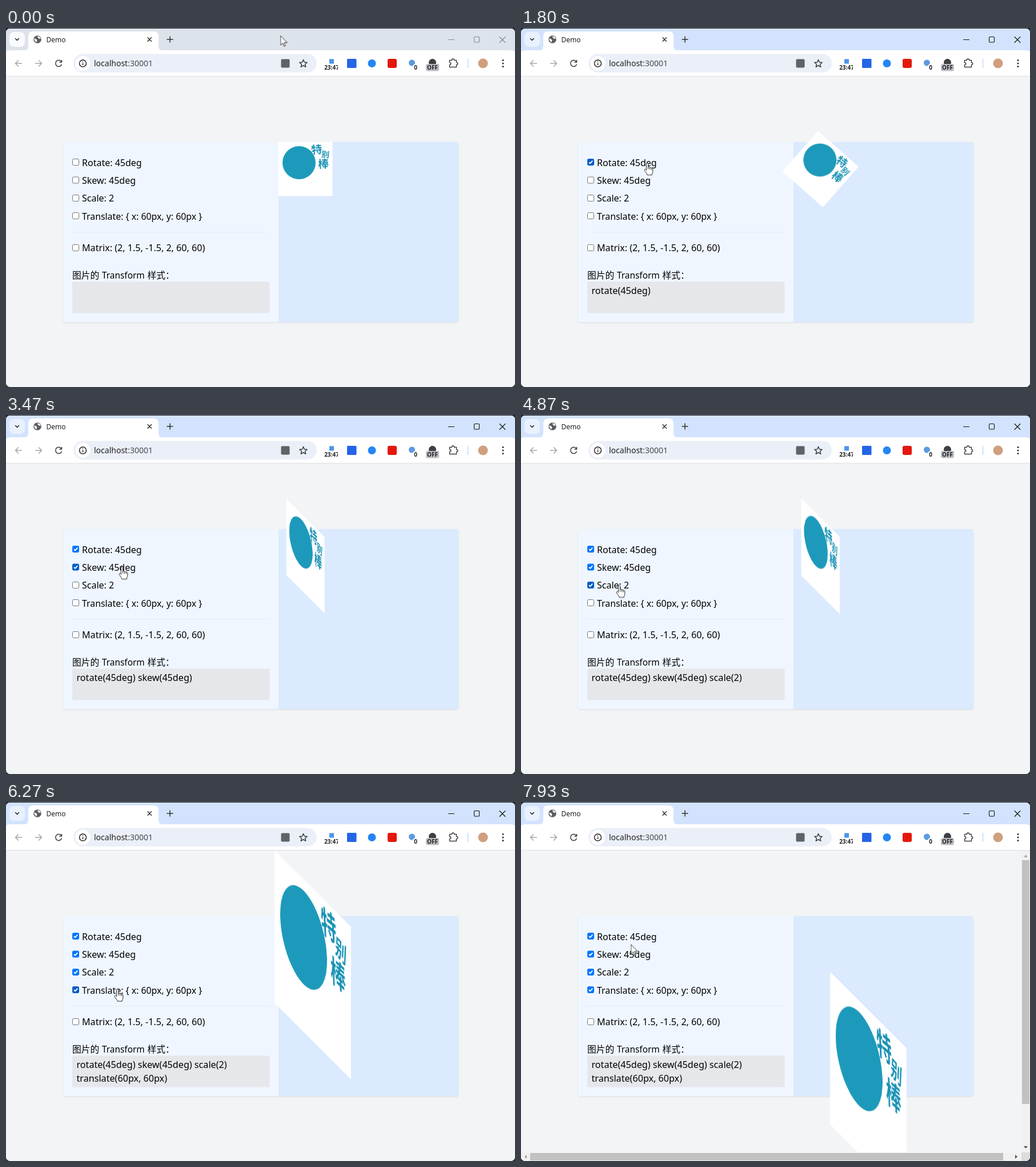
An HTML page for the animation above (8000 ms loop, 891 px wide and 629 px high).

```html
<!DOCTYPE html>
<html lang="zh">
<head>
<meta charset="utf-8">
<title>Demo</title>
<style>
  html, body { margin: 0; height: 100%; overflow: hidden; background: #23262c; }
  svg { display: block; width: 100vw; height: 100vh; font: 16px "Noto Sans", "Open Sans", sans-serif; }
  .cjk { font-family: "Noto Sans CJK SC", "Noto Sans CJK", sans-serif; }
  .label { font-size: 15.75px; }
  .output { font-size: 16.15px; }
  .line { fill: none; stroke-width: 1.5; stroke-linecap: round; stroke-linejoin: round; }
  .badge { font-size: 10px; font-weight: 700; text-anchor: middle; fill: #202124; }
  .step { animation: 8s step-end infinite; }

  /* window focus */
  .strip { fill: #d3e3fd; animation-name: strip; }
  .menu { fill: #e9f1fe; animation-name: menu; }
  .controls { stroke: #111; stroke-width: 1.1; animation-name: controls; }
  @keyframes strip { 0% { fill: #dde3eb } 15% { fill: #d3e3fd } }
  @keyframes menu { 0% { fill: #fafbfd } 15% { fill: #e9f1fe } }
  @keyframes controls { 0% { stroke: #85898f } 15% { stroke: #111 } }

  /* checkboxes: idle, hover, press, checked; the white tick shows once the box is blue */
  .box { fill: #fff; stroke: #767676; }
  .tick { stroke: #fff; stroke-width: 1.8; stroke-linecap: butt; }
  .rotate { animation-name: rotate; }
  .skew { animation-name: skew; }
  .scale { animation-name: scale; }
  .move { animation-name: move; }
  @keyframes rotate {
    0% { fill: #fff; stroke: #767676 }
    7.3% { fill: #fff; stroke: #4f4f4f }
    15% { fill: #fff; stroke: #8d8d8d }
    17.5% { fill: #005cc8; stroke: #005cc8 }
    25.5%, 100% { fill: #0075ff; stroke: #0075ff }
  }
  @keyframes skew {
    0% { fill: #fff; stroke: #767676 }
    26.1% { fill: #fff; stroke: #4f4f4f }
    34.1% { fill: #fff; stroke: #8d8d8d }
    37.5%, 97% { fill: #005cc8; stroke: #005cc8 }
    51.7%, 98.1%, 100% { fill: #0075ff; stroke: #0075ff }
  }
  @keyframes scale {
    0% { fill: #fff; stroke: #767676 }
    52.5% { fill: #fff; stroke: #4f4f4f }
    57.5% { fill: #fff; stroke: #8d8d8d }
    60.8% { fill: #005cc8; stroke: #005cc8 }
    65.9%, 100% { fill: #0075ff; stroke: #0075ff }
  }
  @keyframes move {
    0% { fill: #fff; stroke: #767676 }
    66.9% { fill: #fff; stroke: #4f4f4f }
    74.1% { fill: #fff; stroke: #8d8d8d }
    77.5% { fill: #005cc8; stroke: #005cc8 }
    95.5%, 100% { fill: #0075ff; stroke: #0075ff }
  }

  /* things that appear once */
  .out1 { animation-name: out1; }
  .out2 { animation-name: out2; }
  .out3 { animation-name: out3; }
  .out4 { animation-name: out4; }
  .bars { animation-name: bars; }
  @keyframes out1 { 0% { visibility: hidden } 17.5% { visibility: visible } }
  @keyframes out2 { 0% { visibility: hidden } 37.5% { visibility: visible } }
  @keyframes out3 { 0% { visibility: hidden } 60.8% { visibility: visible } }
  @keyframes out4 { 0% { visibility: hidden } 77.5% { visibility: visible } }
  @keyframes bars { 0% { visibility: hidden } 83% { visibility: visible } }

  .picture { transform-origin: 524.25px 247.25px; animation: picture 8s ease-in-out infinite; }
  @keyframes picture {
    0%, 17.5% { transform: rotate(0deg) skew(0deg) scale(1) translate(0px, 0px) }
    23.75%, 37% { transform: rotate(45deg) skew(0deg) scale(1) translate(0px, 0px) }
    43.25%, 60.4% { transform: rotate(45deg) skew(45deg) scale(1) translate(0px, 0px) }
    66.65%, 76.7% { transform: rotate(45deg) skew(45deg) scale(2) translate(0px, 0px) }
    82.95%, 100% { transform: rotate(45deg) skew(45deg) scale(2) translate(59.06px, 59.06px) }
  }

  .cursor { animation: cursor 8s ease-in-out infinite; fill: #fff; stroke: #222; stroke-linejoin: round; }
  .arrow { animation-name: arrow; }
  .hand { animation-name: hand; }
  @keyframes cursor {
    0%, 1.75% { transform: translate(480.5px, 13.5px) }
    8.4%, 24.1% { transform: translate(221px, 236.5px) }
    27.5%, 49.2% { transform: translate(203px, 266.5px) }
    55%, 63.75% { transform: translate(172px, 298.5px) }
    66.6% { transform: translate(192.5px, 315.5px) }
    70%, 94.2% { transform: translate(195px, 328px) }
    99.1%, 100% { transform: translate(192.5px, 249.5px) }
  }
  @keyframes arrow {
    0%, 25.5%, 51.7%, 65.9%, 95.5%, 98.1%, 100% { visibility: visible }
    7.3%, 26.1%, 52.5%, 66.9%, 97% { visibility: hidden }
  }
  @keyframes hand {
    0%, 25.5%, 51.7%, 65.9%, 95.5%, 98.1%, 100% { visibility: hidden }
    7.3%, 26.1%, 52.5%, 66.9%, 97% { visibility: visible }
  }
</style>
</head>
<body>
<svg viewBox="0 0 891 629">
  <defs>
    <clipPath id="window"><rect y="1" width="891" height="628" rx="7"/></clipPath>
    <clipPath id="page"><rect y="85" width="891" height="544"/></clipPath>
    <clipPath id="card"><rect x="100" y="200" width="692" height="315.5" rx="4"/></clipPath>
    <clipPath id="clock"><rect x="557" y="63" width="24" height="12"/></clipPath>
    <path id="tick" class="line tick" d="M2.5 5.7 4.6 7.9 8.7 3.1"/>
  </defs>

  <g clip-path="url(#window)">
    <rect width="891" height="629" fill="#f3f4f6"/>

    <!-- tab strip -->
    <rect class="step strip" width="891" height="40"/>
    <rect class="step menu" x="6" y="7" width="27" height="26" rx="8"/>
    <path class="line" d="M16.5 18.5 19.5 21.5 22.5 18.5" stroke="#222"/>
    <path d="M30 40c6 0 9-3 9-9V15c0-6 3-9 9-9H258c6 0 9 3 9 9V31c0 6 3 9 9 9z" fill="#fff"/>
    <circle cx="55" cy="20" r="6.8" fill="#5a5e63"/>
    <path d="M49.5 18.5c2 .3 4 1 4.6 2.5s-.6 2-.1 3.8c-2.5-.5-4.8-3-4.5-6.3zM55.5 14.5c2 0 4.5 1.5 5.2 3.5-1 1.5-3 .8-4-.3s-2-1.7-1.2-3.2z" fill="#fff"/>
    <text x="70.5" y="25" font-size="12" fill="#1f1f1f">Demo</text>
    <path class="line" d="M248 16.7 254.6 23.3M254.6 16.7 248 23.3M282 20H292M287 15V25" stroke="#333"/>
    <g class="line step controls">
      <path d="M774.5 20.5H784.5M864 15.5 874 25.5M874 15.5 864 25.5"/>
      <rect x="819.5" y="15.5" width="9" height="9.5" rx="1.5"/>
    </g>

    <!-- toolbar -->
    <path d="M0 85V47q0-8 8-8H883q8 0 8 8V85z" fill="#fff"/>
    <path d="M0 84.5H891" stroke="#dcdfe3"/>
    <path class="line" d="M27.5 62H16.5M21.5 57 16.5 62 21.5 67M51.5 62H62.5M57.5 57 62.5 62 57.5 67" stroke="#a2a5a9"/>
    <path class="line" d="M97.2 59.5a5.5 5.5 0 1 0 .1 4.6M97.5 56.5V60H94" stroke="#3c4043"/>
    <rect x="118" y="45.5" width="426" height="32.5" rx="16.2" fill="#ebeff8"/>
    <circle cx="134.5" cy="62" r="13" fill="#fff"/>
    <circle class="line" cx="134.5" cy="62" r="6" stroke="#222"/>
    <path d="M134.5 61.5V65M134.5 58.5V60" stroke="#222" stroke-width="1.5"/>
    <text x="154" y="67" font-size="14" fill="#1f1f1f">localhost<tspan fill="#474a50">:30001</tspan></text>
    <rect x="481.5" y="54.5" width="15" height="15" rx="2" fill="#5f6368"/>
    <path class="line" d="M520.5 55.5 522.4 60 527.2 60.4 523.5 63.5 524.7 68.3 520.5 65.7 516.3 68.3 517.5 63.5 513.8 60.4 518.6 60z" stroke="#3c4043"/>

    <!-- extensions -->
    <rect x="566" y="54.5" width="8" height="8" fill="#4c96e8"/>
    <g clip-path="url(#clock)"><text class="badge" x="570" y="73">23:47</text></g>
    <rect x="597" y="54" width="16.5" height="16" rx="1.5" fill="#2464e8"/>
    <circle cx="640.5" cy="62" r="7" fill="#2585f5"/>
    <rect x="668" y="54" width="16" height="16" rx="3" fill="#e3180c"/>
    <circle cx="710.5" cy="61" r="5.5" fill="#5b9be0"/>
    <rect x="712.5" y="64" width="9" height="11" rx="2" fill="#fff"/>
    <text class="badge" x="717" y="73">0</text>
    <circle cx="746.5" cy="60.5" r="6.5" fill="#3c4043"/>
    <rect x="735" y="63" width="23" height="12.5" rx="3" fill="#bcbec2"/>
    <text class="badge" x="746.5" y="73">OFF</text>
    <path class="line" d="M776.5 56.5H780.5C780.5 53.3 784.5 53.3 784.5 56.5H788.5V60.5C791.5 60.5 791.5 64.5 788.5 64.5V68.5H776.5V64.5C779.5 64.5 779.5 60.5 776.5 60.5z" stroke="#3c4043"/>
    <path d="M808.5 54V70" stroke="#c4d9fb" stroke-width="1.5"/>
    <circle cx="835" cy="62" r="8.5" fill="#cf9f7e"/>
    <path class="line" d="M870 56.5v0M870 62v0M870 67.5v0" stroke="#333" style="stroke-width:3.2"/>

    <!-- card -->
    <g style="filter:drop-shadow(0 1px 1px rgba(0,0,0,.1))">
      <g clip-path="url(#card)">
        <rect x="100" y="200" width="378" height="316" fill="#eff6ff"/>
        <rect x="477" y="200" width="315" height="316" fill="#dbeafe"/>
      </g>
    </g>
    <path d="M116 357.5H461" stroke="#e6ebf3"/>
    <rect x="116" y="444.5" width="345.5" height="55" rx="2" fill="#e5e7eb"/>

    <g transform="translate(116.5 229.5)"><rect class="step box rotate" width="11" height="11" rx="2"/><use href="#tick"/></g>
    <g transform="translate(116.5 261)"><rect class="step box skew" width="11" height="11" rx="2"/><use href="#tick"/></g>
    <g transform="translate(116.5 292.5)"><rect class="step box scale" width="11" height="11" rx="2"/><use href="#tick"/></g>
    <g transform="translate(116.5 323.5)"><rect class="step box move" width="11" height="11" rx="2"/><use href="#tick"/></g>
    <rect class="box" x="116.5" y="379.5" width="11" height="11" rx="2"/>

    <text x="133" y="241.5">Rotate: 45deg</text>
    <text x="133" y="273">Skew: 45deg</text>
    <text x="133" y="304.3">Scale: 2</text>
    <text x="133" y="335.8" font-size="15.85">Translate: { x: 60px, y: 60px }</text>
    <text x="133" y="391.4" font-size="16.1">Matrix: (2, 1.5, -1.5, 2, 60, 60)</text>
    <text class="cjk label" x="116" y="439">图片的</text>
    <text x="168" y="438.5" font-size="15.4">Transform</text>
    <text class="cjk label" x="247.5" y="439">样式：</text>
    <text class="output" x="123.5" y="466.3"><tspan class="step out1">rotate(45deg)</tspan><tspan class="step out2"> skew(45deg)</tspan><tspan class="step out3"> scale(2)</tspan></text>
    <text class="output step out4" x="123.5" y="489.8">translate(60px, 60px)</text>

    <!-- transformed picture -->
    <g clip-path="url(#page)">
      <g class="picture">
        <rect x="477" y="200" width="94.5" height="94.5" fill="#fff"/>
        <circle cx="513" cy="236" r="29" fill="#1d9abb"/>
        <g class="cjk" fill="#1b93b5" font-weight="700" text-anchor="middle">
          <text transform="translate(544.5 220) rotate(-5)" font-size="19">特</text>
          <text transform="translate(558.7 226.5) rotate(5)" font-size="14">别</text>
          <text transform="translate(556 245) rotate(-3)" font-size="19">棒</text>
        </g>
      </g>
    </g>

    <!-- scrollbars -->
    <g class="step bars">
      <path d="M876 85H891V614H876zM0 614H876V629H0z" fill="#f1f1f1"/>
      <rect x="876" y="614" width="15" height="15" fill="#dcdcdc"/>
      <path d="M877 102H890V529H877zM16 615H844V628H16z" fill="#c1c1c1"/>
      <path d="M880 96.5 883.5 92.5 887 96.5zM10 618 6 621.5 10 625z" fill="#a3a3a3"/>
      <path d="M880 603 883.5 607 887 603zM865 618 869 621.5 865 625z" fill="#505050"/>
    </g>

    <g class="cursor">
      <path class="step arrow" d="M0 0V16.5L3.8 13 6.2 18.7 8.6 17.7 6.2 12.1H11.5z"/>
      <g class="step hand">
        <path d="M-1.6 1.2c0-1.7 3.2-1.7 3.2 0v6c.8-.8 2.9-.6 3 .8 .9-.7 2.7-.3 2.8 1 1-.5 2.4 0 2.4 1.4v4.6c0 2.5-1.6 3-1.6 6h-8.2c0-2.3-1.8-3.3-4.6-7.6-1.3-2 .9-3.4 2.4-1.6l.6.8z"/>
        <path d="M1.6 7V11M4.6 8V11.5M7.4 9V12"/>
      </g>
    </g>
  </g>
</svg>
</body>
</html>
```
